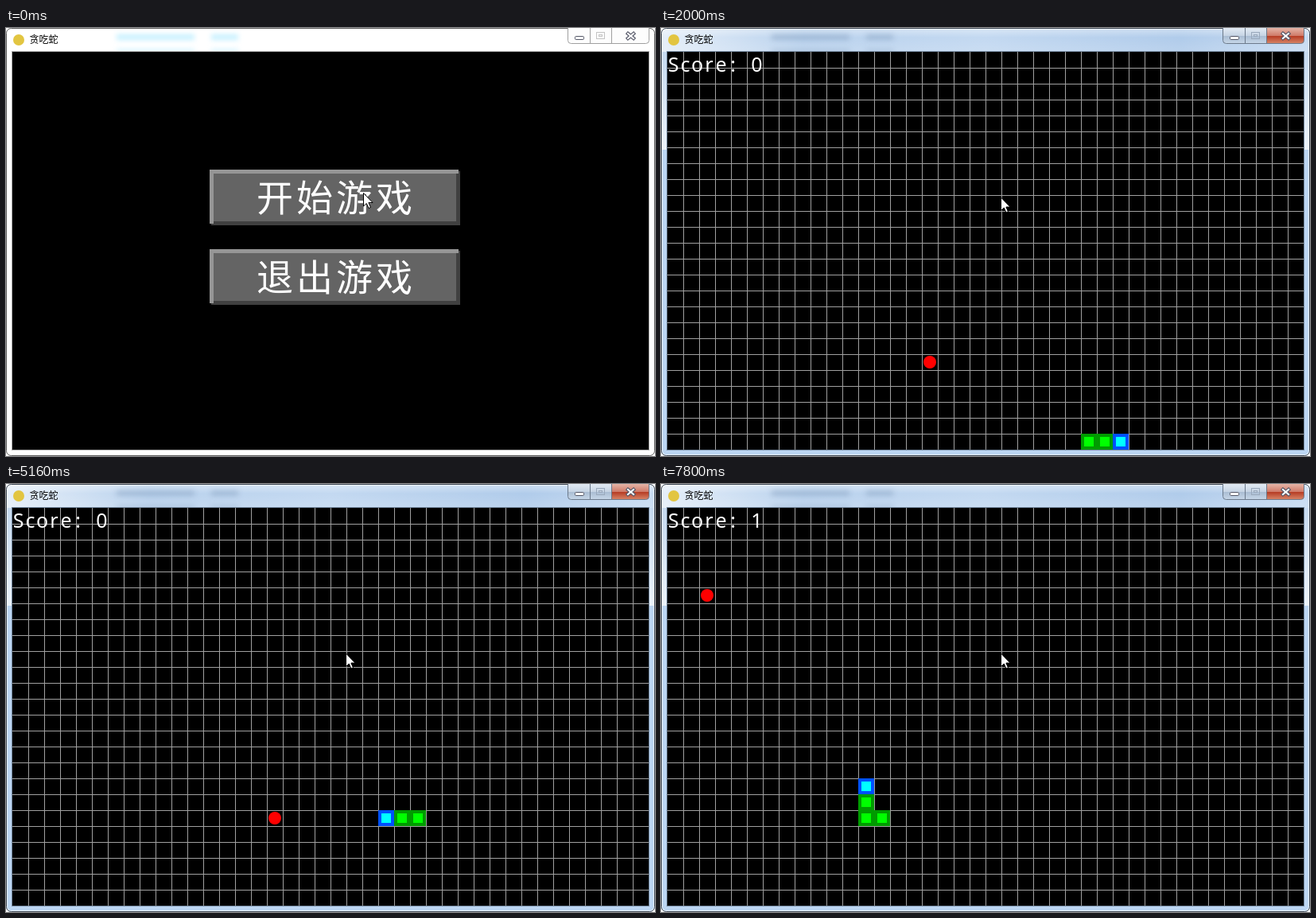
An HTML page with a canvas that plays this animation: 816 px wide and 538 px high, repeating every 8 s.

```html
<!DOCTYPE html>
<html lang="zh">
<head>
<meta charset="utf-8">
<title>贪吃蛇</title>
<style>
html, body { margin: 0; width: 100%; height: 100%; overflow: hidden; background: #fff; }
canvas { display: block; }
</style>
</head>
<body>
<canvas width="816" height="538"></canvas>
<script>
const ctx = document.querySelector('canvas').getContext('2d');
const LOOP = 8000, CELL = 20, LEFT = 8, TOP = 30;
const CJK = '"Noto Sans CJK SC", "Noto Sans CJK", sans-serif';

function rect(color, x, y, w, h) {
  ctx.fillStyle = color;
  ctx.fillRect(x, y, w, h);
}

function disc(color, x, y, r) {
  ctx.fillStyle = color;
  ctx.beginPath();
  ctx.arc(x, y, r, 0, Math.PI * 2);
  ctx.fill();
}

function gradient(x0, y0, x1, y1, stops) {
  const g = ctx.createLinearGradient(x0, y0, x1, y1);
  stops.forEach(([at, color]) => g.addColorStop(at, color));
  return g;
}

function path(points, fill, stroke, width = 1) {
  ctx.beginPath();
  points.forEach(([x, y]) => ctx.lineTo(x, y));
  if (fill) { ctx.closePath(); ctx.fillStyle = fill; ctx.fill(); }
  if (stroke) { ctx.strokeStyle = stroke; ctx.lineWidth = width; ctx.stroke(); }
}

// One glyph centred in each cell of a fixed pitch
function cellText(text, x, y, pitch, font) {
  ctx.font = font;
  ctx.fillStyle = '#fff';
  ctx.textAlign = 'center';
  [...text].forEach((c, i) => ctx.fillText(c, x + (i + 0.5) * pitch, y));
  ctx.textAlign = 'left';
}

function smudges(color) {
  ctx.save();
  ctx.filter = 'blur(3px)';
  for (const [x, w] of [[139, 98], [258, 34]]) {
    rect(color, x, 8, w, 7);
    rect(color, x, 27, w, 3);
  }
  ctx.restore();
}

function captionButtons(active) {
  ctx.save();
  ctx.beginPath();
  ctx.roundRect(706.5, -4, 102, 23.5, 4);
  ctx.save();
  ctx.clip();
  if (active) {
    rect(gradient(0, 0, 0, 20, [[0, '#e3ebf4'], [.48, '#c6d4e4'], [.5, '#a9bcd2'], [1, '#c9d9ea']]), 706, 0, 56, 20);
    rect(gradient(0, 0, 0, 20, [[0, '#e5b5a8'], [.48, '#cf7b69'], [.5, '#b53a22'], [1, '#d98a6c']]), 762, 0, 47, 20);
  } else {
    rect('#fdfdfd', 706, 0, 103, 20);
  }
  ctx.restore();
  ctx.strokeStyle = active ? '#6c7a8b' : '#a0a0a0';
  ctx.lineWidth = 1;
  ctx.stroke();
  ctx.fillStyle = ctx.strokeStyle;
  ctx.fillRect(734, 0, 1, 19);
  ctx.fillRect(761, 0, 1, 19);

  ctx.fillStyle = '#fff';
  ctx.strokeStyle = '#535666';
  ctx.beginPath();
  ctx.roundRect(715.5, 10.5, 11, 4, 1);
  ctx.fill();
  ctx.stroke();
  ctx.strokeStyle = active ? '#9aa9bc' : '#c4c4c4';
  ctx.strokeRect(742.5, 5.5, 10, 8);
  ctx.strokeRect(745.5, 8.5, 4, 2);
  ctx.lineCap = 'square';
  for (const [color, width] of [['#535666', 4.4], ['#fff', 2.2]]) {
    path([[782, 7], [789, 13]], null, color, width);
    path([[789, 7], [782, 13]], null, color, width);
  }
  ctx.restore();
}

function chrome(active) {
  ctx.save();
  ctx.beginPath();
  ctx.roundRect(.5, .5, 815, 537, 6);
  ctx.clip();
  rect('#fff', 0, 0, 816, 538);
  if (active) {
    rect('#bcd6f3', 0, 0, 816, 538);
    rect(gradient(0, 30, 0, 153, [[0, '#c6daf0'], [1, '#edf4fb']]), 0, 30, 816, 123);
    rect(gradient(0, 0, 816, 0, [[0, '#e3edf8'], [.1, '#cfe0f3'], [.22, '#b5cfec'],
      [.5, '#bfd6f0'], [.8, '#abc8e9'], [1, '#c4d9f1']]), 0, 0, 816, 30);
    rect(gradient(0, 0, 0, 30, [[0, '#ffffff70'], [.4, '#ffffff10'], [1, '#ffffff30']]), 0, 0, 816, 30);
  }
  smudges(active ? '#7f9cbb70' : '#c5f0ff');
  ctx.restore();

  ctx.lineWidth = 1;
  ctx.strokeStyle = active ? '#ffffffb0' : '#ffffff';
  ctx.beginPath();
  ctx.roundRect(1.5, 1.5, 813, 535, 5);
  ctx.stroke();
  ctx.strokeStyle = active ? '#3f4a57' : '#606060';
  ctx.beginPath();
  ctx.roundRect(.5, .5, 815, 537, 6);
  ctx.stroke();
  ctx.strokeStyle = active ? '#72869c' : '#a8a8a8';
  ctx.strokeRect(7.5, 29.5, 801, 501);
  captionButtons(active);
}

function windowFrame(focus) {
  if (focus < 1) chrome(false);
  ctx.globalAlpha = focus;
  if (focus > 0) chrome(true);
  ctx.globalAlpha = 1;
  disc('#e2c541', 16, 15, 7);
  ctx.font = '12px ' + CJK;
  ctx.fillStyle = '#000';
  ctx.fillText('贪吃蛇', 29.5, 19);
  rect('#000', LEFT, TOP, 800, 500);
}

function menuButton(label, y) {
  rect('#404040', 258, y + 2, 313, 68);
  rect('#969696', 256, y, 313, 5);
  rect('#969696', 256, y, 5, 68);
  rect('#646464', 261, y + 5, 305, 60);
  cellText(label, 313, y + 52, 50, '300 46px ' + CJK);
}

// Cell of the head after n moves: right, up, left, up
function headAt(n) {
  if (n <= 8) return [23 + n, 24];
  if (n <= 13) return [31, 32 - n];
  if (n <= 32) return [44 - n, 19];
  return [12, 51 - n];
}

function moveCount(t) {
  if (t < 2360) return Math.floor((t - 1000) / 200);
  return Math.min(7 + Math.floor((t - 2360) / 200), t < 7800 ? 33 : 34);
}

function game(t) {
  const n = moveCount(t), score = n >= 28 ? 1 : 0;
  for (let x = CELL; x < 800; x += CELL) rect('#a0a0a0', LEFT + x, TOP, 1, 500);
  for (let y = CELL; y < 500; y += CELL) rect('#a0a0a0', LEFT, TOP + y, 800, 1);

  for (let i = 0; i < 3 + score; i++) {
    const [col, row] = headAt(n - i);
    const x = LEFT + col * CELL, y = TOP + row * CELL;
    rect(i ? '#009b00' : '#0050ff', x, y, CELL, CELL);
    rect(i ? '#00ff00' : '#00ffff', x + 4, y + 4, 12, 12);
  }
  const [col, row] = score ? [2, 5] : [16, 19];
  disc('#f00', LEFT + (col + .5) * CELL, TOP + (row + .5) * CELL, 8);
  cellText('Score: ' + score, LEFT, 55, 15, '25px "Noto Sans", sans-serif');
}

function cursor(x, y) {
  const shape = [[0, 0], [0, 16.5], [3.8, 13], [6.5, 19], [9, 18], [6.4, 12], [11.5, 12]];
  path(shape.map(([dx, dy]) => [x + dx, y + dy]), '#fff', '#000');
}

function draw(t) {
  ctx.clearRect(0, 0, 816, 538);
  windowFrame(t < 560 ? 0 : t < 680 ? .5 : 1);
  if (t < 1000) {
    menuButton('开始游戏', 178);
    menuButton('退出游戏', 278);
  } else {
    game(t);
  }
  if (t < 80) cursor(449.5, 207.5);
  else if (t < 560) cursor(434.5, 202.5);
  else cursor(427.5, 213);
  if (t >= 560 && t < 1440) disc('rgba(255,255,0,.5)', 427, 213, 12);
}

const start = performance.now();
function tick() {
  draw((performance.now() - start) % LOOP);
  requestAnimationFrame(tick);
}
tick();
</script>
</body>
</html>
```
